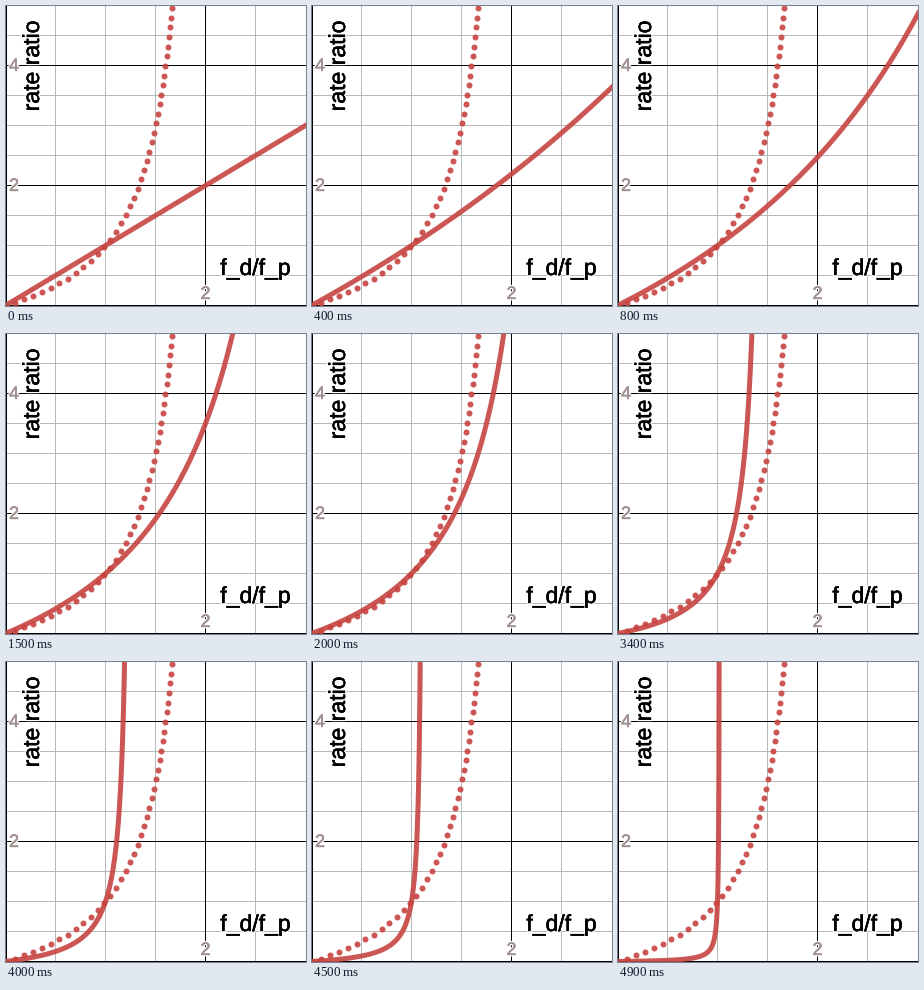
A matplotlib script for the animation above (5 s loop, 300 by 300 pixels).

```python
import numpy as np
import matplotlib.pyplot as plt
from matplotlib.animation import FuncAnimation
from matplotlib.patheffects import withStroke

SIZE, DPI = 300, 100
FRAMES, INTERVAL = 50, 100
PX = 72 / DPI                      # one pixel in points
UNIT_X, UNIT_Y = 100, 60
ORIGIN_X, ORIGIN_Y = -0.5, 299.5
RED = "#c74440"

plt.rcParams["font.family"] = "Liberation Sans"
fig = plt.figure(figsize=(SIZE / DPI, SIZE / DPI), dpi=DPI, facecolor="white")
ax = fig.add_axes([0, 0, 1, 1])
ax.set(xlim=(0, SIZE), ylim=(SIZE, 0))
ax.axis("off")


def curve(a):
    """Pixel path of y = x (1 - a) / (1 - a x), sampled along y."""
    y = 5.3 * np.linspace(0, 1, 800) ** 3
    x = y / (1 - a + a * y)
    return ORIGIN_X + x * UNIT_X, ORIGIN_Y - y * UNIT_Y


def dots(a, step):
    """Points at equal arc length along the curve."""
    x, y = curve(a)
    length = np.concatenate([[0], np.cumsum(np.hypot(np.diff(x), np.diff(y)))])
    s = np.arange(0, length[-1], step)
    return np.interp(s, length, x), np.interp(s, length, y)


def label(x, y, text, size, color, **kw):
    """Text with a white halo and slightly thickened strokes."""
    effects = [withStroke(linewidth=3 * PX, foreground="white"),
               withStroke(linewidth=0.4 * PX, foreground=color)]
    ax.text(x, y, text, fontsize=size * PX, color=color, ha="center",
            va="baseline", zorder=5, path_effects=effects, **kw)


def grid(xs, ys, color, zorder):
    style = dict(color=color, lw=PX, zorder=zorder, snap=False)
    ax.vlines(xs, 0, SIZE, **style)
    ax.hlines(ys, 0, SIZE, **style)


grid([49.5, 99.5, 149.5, 249.5], np.arange(29.5, 299, 30), "#b8b8b8", 1)
grid([0.5, 199.5], [59.5, 179.5, 299.5], "black", 2)

ax.plot(*dots(0.5, 9.69), "o", ms=6 * PX, mew=0, color=RED, alpha=0.9,
        zorder=3, snap=False)
line, = ax.plot([], [], color=RED, lw=5 * PX, alpha=0.9, zorder=4,
                solid_capstyle="round", solid_joinstyle="round", snap=False)

for x, y, text in [(8, 65, "4"), (8, 185, "2"), (199.5, 293, "2")]:
    label(x, y, text, 18, "#a39090")
label(249.5, 269, "f_d/f_p", 23, "black")
label(33, 60, "rate ratio", 23, "black", rotation=90, rotation_mode="anchor")


def update(frame):
    line.set_data(*curve(frame / FRAMES))
    return line,


anim = FuncAnimation(fig, update, frames=FRAMES, interval=INTERVAL,
                     repeat=True, repeat_delay=0, blit=False)
plt.show()
```
